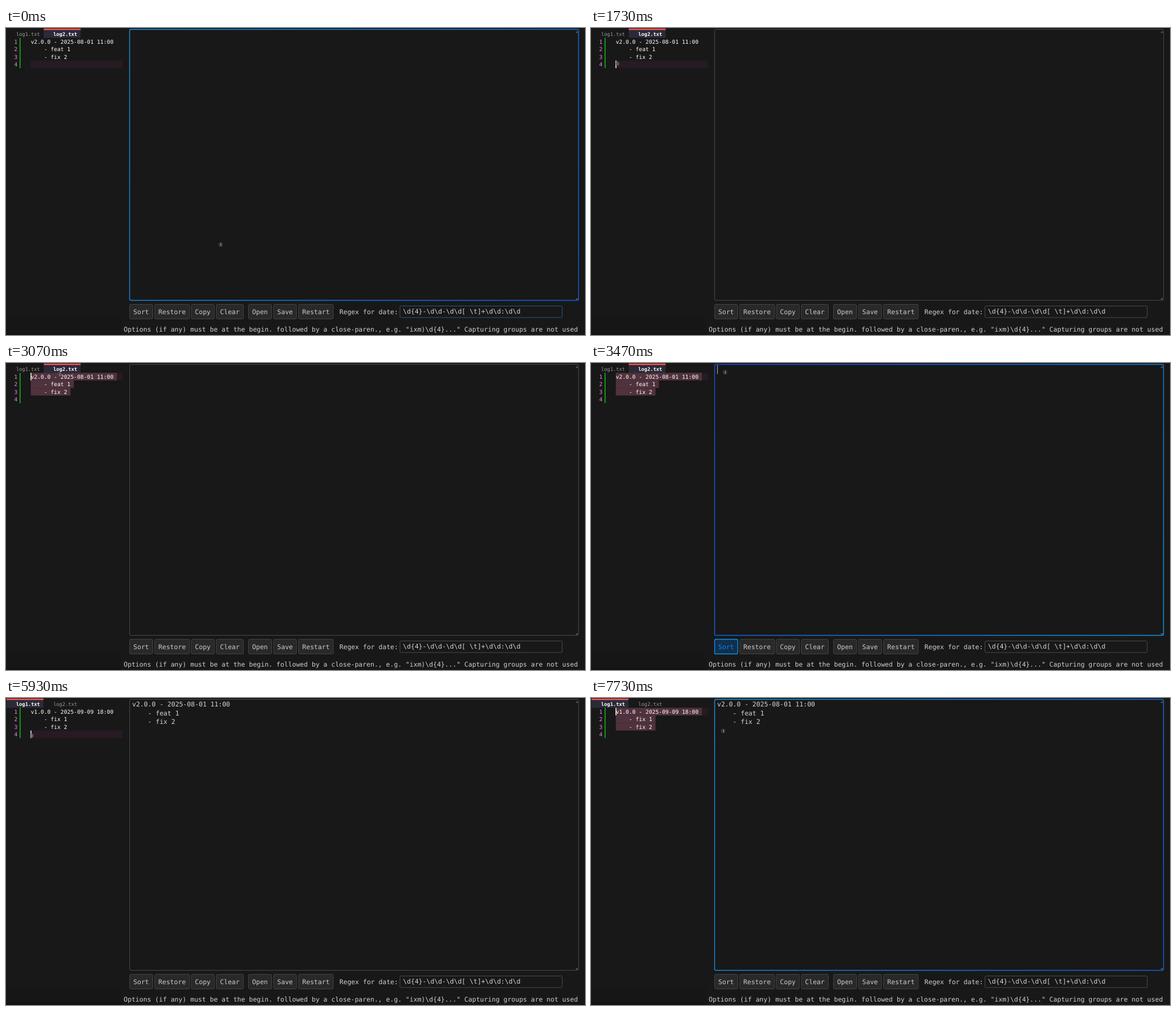
An HTML page with a canvas that plays this animation: 1028 px wide and 545 px high, repeating every 8 s.

```html
<!DOCTYPE html>
<html lang="en">
<head>
<meta charset="utf-8">
<title>Log sorter</title>
<style>
  html, body { margin: 0; width: 100%; height: 100%; overflow: hidden; background: #181818; }
  canvas { display: block; }
</style>
</head>
<body>
<canvas id="stage" width="1028" height="545"></canvas>
<script>
const ctx = document.getElementById('stage').getContext('2d');
const LOOP = 8000, TICK = 200 / 3;
const MONO = '"DejaVu Sans Mono", "Noto Sans Mono", monospace';
const UI = '11.555px ' + MONO, CODE = '9.767px ' + MONO, TAB = '8.8px ' + MONO;
const CHAR = 5.88, LINE = 13.45, TOP = 17.4, LEFT = 44;

const logs = [
  ['v1.0.0 - 2025-09-09 18:00', '    - fix 1', '    - fix 2', ''],
  ['v2.0.0 - 2025-08-01 11:00', '    - feat 1', '    - fix 2', '']
];
const buttons = [
  ['Sort', 219, 42], ['Restore', 263.5, 63], ['Copy', 328.5, 42], ['Clear', 373, 49],
  ['Open', 430, 42], ['Save', 474.5, 42], ['Restart', 519, 62.5]
];

// Pointer path: time, x, y
const path = [
  [0, 381, 384.5], [333, 347, 386], [533, 347, 386], [800, 191, 152], [933, 120, 99],
  [1133, 117, 99], [1533, 50, 66.5], [1667, 50, 66.5], [1867, 42, 57], [2200, 39, 36],
  [2467, 38, 22], [2933, 38, 22], [3400, 238, 16.5], [4400, 238, 16.5], [5000, 38, 15],
  [5467, 38, 15], [5667, 52, 40], [5933, 46, 67], [6067, 46, 67], [6400, 37, 22],
  [7133, 37, 22], [7733, 234.5, 58.5]
];

// Times of the hard changes
const PRESS1 = 1733, FOCUS = 3466, PASTE = 4000, SWITCH = 5266, BLUR = 5333, PRESS2 = 6133;

function pointer(t) {
  const i = path.findIndex(k => k[0] > t);
  if (i < 0) return path[path.length - 1].slice(1);
  const [t0, x0, y0] = path[i - 1], [t1, x1, y1] = path[i];
  const p = (t - t0) / (t1 - t0);
  return [x0 + (x1 - x0) * p, y0 + (y1 - y0) * p];
}

function box(x, y, w, h, color) {
  ctx.fillStyle = color;
  ctx.fillRect(x, y, w, h);
}

function frame(x, y, w, h, r, stroke, fill, width = 1) {
  ctx.beginPath();
  ctx.roundRect(x + .5, y + .5, w - 1, h - 1, r);
  if (fill) { ctx.fillStyle = fill; ctx.fill(); }
  ctx.strokeStyle = stroke;
  ctx.lineWidth = width;
  ctx.stroke();
}

function text(s, x, y, font, color) {
  ctx.font = font;
  ctx.fillStyle = color;
  ctx.fillText(s, x, y);
}

function arrow(x, y, dir) {
  ctx.fillStyle = '#5c5c5c';
  ctx.beginPath();
  ctx.moveTo(x - 2.5, y + 1.5 * dir);
  ctx.lineTo(x + 2.5, y + 1.5 * dir);
  ctx.lineTo(x, y - 1.5 * dir);
  ctx.fill();
}

function drawTab(name, x, active) {
  if (active) {
    box(x, 1, 65.5, 16.5, '#2a2a38');
    box(x, 1, 65.5, 2.6, '#f0554f');
  }
  text(name, x + 17, 14.2, (active ? 'bold ' : '') + TAB, active ? '#ffffff' : '#9a9a9a');
}

function drawEditor(t, my) {
  const second = t < SWITCH;
  const lines = logs[second ? 1 : 0];
  drawTab('log1.txt', 1, !second);
  drawTab('log2.txt', 67, second);

  const dragging = second ? t >= PRESS1 : t >= PRESS2;
  const dragEnd = second ? 2467 : 6400;
  let row = 3;
  if (dragging) row = t >= dragEnd ? 0 : Math.max(0, Math.min(3, Math.floor((my - TOP) / LINE)));

  box(LEFT, TOP + row * LINE, 163.5, LINE, '#261a23');
  for (let i = row; i < 3; i++) {
    box(LEFT, TOP + i * LINE, (lines[i].length + 1) * CHAR, LINE, '#50323d');
  }
  box(24, TOP, 2, LINE * 4, '#0c9a12');
  lines.forEach((s, i) => {
    const y = TOP + i * LINE + 10.2;
    text(i + 1, 14.5, y, CODE, '#f57be6');
    text(s, LEFT, y, CODE, '#ffffff');
  });
  const focused = (t >= PRESS1 && t < FOCUS) || t >= SWITCH;
  if (focused) box(LEFT - .4, TOP + row * LINE, 1.5, LINE, '#ffffff');
}

function areaBorder(focused, hover) {
  if (!focused && !hover) return '#4a4a4a';
  const g = ctx.createLinearGradient(219, 2, 1017, 484);
  const ends = focused ? ['#1650d8', '#1296e4'] : ['#1b95e0', '#0f62dc'];
  ends.forEach((c, i) => g.addColorStop(i, c));
  return g;
}

function drawApp(t, mx, my) {
  const focused = t >= FOCUS && t < BLUR;
  const hover = mx > 219 && mx < 1017 && my > 2 && my < 484;
  frame(219, 2, 798, 482, 2.5, areaBorder(focused, hover), null, focused || hover ? 1.4 : 1);
  arrow(1013.5, 7, 1);
  arrow(1013.5, 481.5, -1);

  const pasted = t >= PASTE;
  if (pasted) logs[1].forEach((s, i) => text(s, 224, 15.4 + i * 15.5, UI, '#d6d6d6'));
  const blinkOn = !pasted || Math.floor((t - PASTE) / 533) % 2 === 0;
  if (focused && blinkOn) box(224, pasted ? 50.5 : 4, 1, 15.5, '#b8b8b8');

  buttons.forEach(([label, x, w], i) => {
    const lit = focused && i === 0;
    frame(x, 490, w, 27, 2, lit ? '#118ee6' : '#434343', lit ? '#10304f' : '#292929', lit ? 1.4 : 1);
    text(label, x + 7, 507.8, UI, lit ? '#1480ea' : '#cccccc');
  });

  text('Regex for date:', 592, 508.3, UI, '#d0d0d0');
  const fade = Math.max(0, 1 - t / 333);
  const mix = (a, b) => Math.round(a + (b - a) * fade);
  frame(699, 493, 289, 21.5, 2, `rgb(${mix(74, 36)},${mix(74, 92)},${mix(74, 132)})`, '#181818');
  text('\\d{4}-\\d\\d-\\d\\d[ \\t]+\\d\\d:\\d\\d', 704.8, 507.3, UI, '#d6d6d6');
  text('Options (if any) must be at the begin. followed by a close-paren., e.g. "ixm)\\d{4}..." Capturing groups are not used',
    209, 538.8, UI, '#d0d0d0');
}

function drawPointer(x, y) {
  ctx.fillStyle = 'rgba(80,80,80,.5)';
  ctx.beginPath();
  ctx.arc(x, y, 4, 0, Math.PI * 2);
  ctx.fill();
  box(Math.round(x), y - 3, 1, 6, '#9a9a9a');
}

function draw(now) {
  // The picture advances in steps of one fifteenth of a second
  const t = Math.floor((now % LOOP + 4) / TICK) * TICK % LOOP;
  const [mx, my] = pointer(t);
  ctx.textRendering = 'geometricPrecision';
  box(0, 0, 1028, 545, '#181818');
  box(0, 514, 205, 31, '#161616');
  box(0, 542, 205, 3, '#121212');
  drawEditor(t, my);
  drawApp(t, mx, my);
  if (t < PASTE || t >= 4450) drawPointer(mx, my);
}

let start;
function loop() {
  const now = performance.now();
  if (start === undefined) start = now;
  draw(now - start);
  requestAnimationFrame(loop);
}
loop();
</script>
</body>
</html>
```
